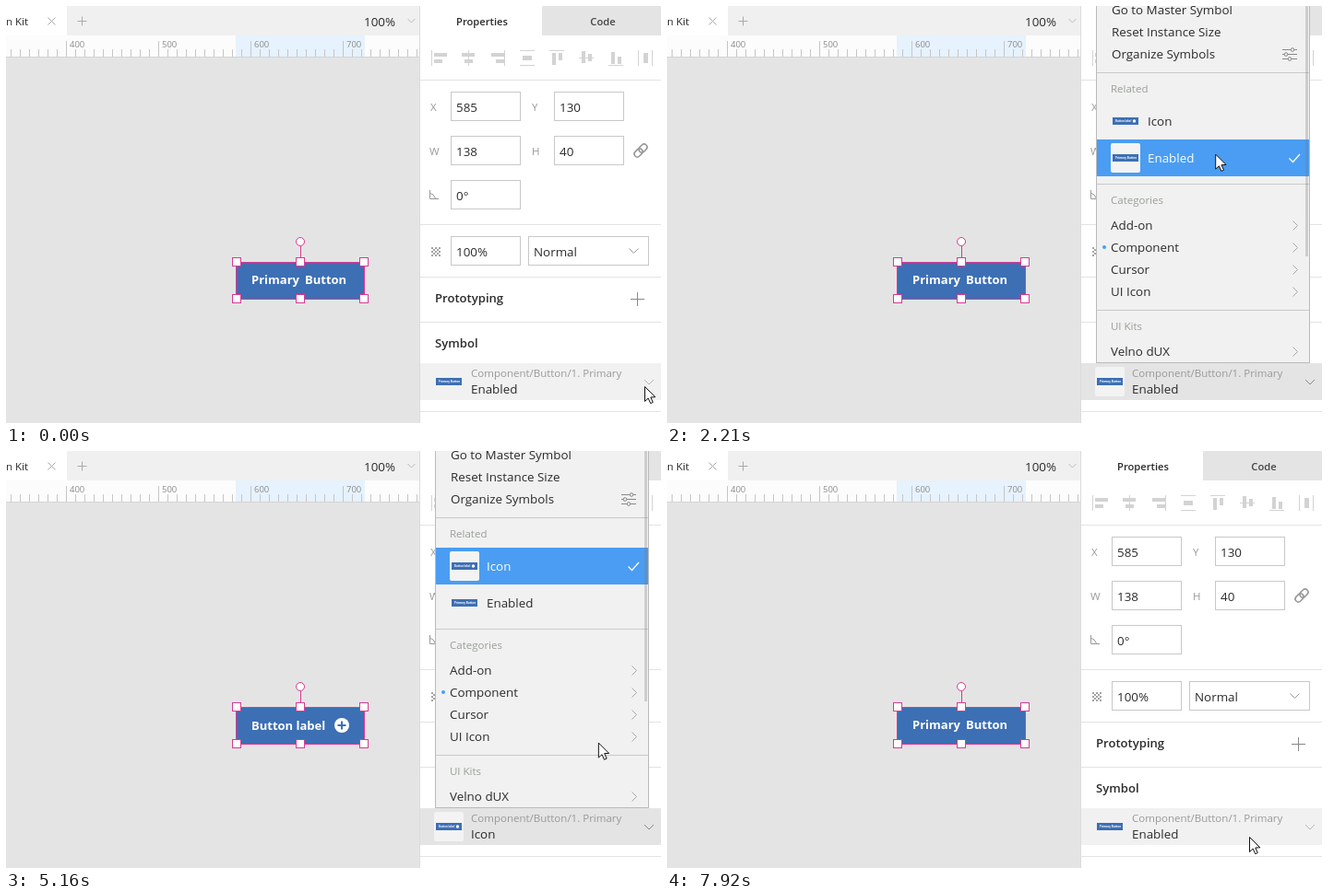
An HTML page with a canvas for the animation above (8 s loop, 710 px wide and 453 px high).

```html
<!DOCTYPE html>
<html lang="en">
<head>
<meta charset="utf-8">
<title>Symbol menu</title>
<style>
html, body { margin: 0; width: 100%; height: 100%; overflow: hidden; background: #e4e4e4; }
canvas { display: block; width: 710px; height: 453px; }
</style>
</head>
<body>
<canvas id="stage" width="710" height="453"></canvas>
<script>
const ctx = document.getElementById('stage').getContext('2d');
const LOOP = 8000;
const INK = '#2b2b2b', MUTED = '#999', BLUE = '#3d6fb4', HIGHLIGHT = '#4a9df2', PINK = '#d83a92';
const BODY = 13.4, SMALL = 11.5;

// Pointer waypoints: time, x, y
const PATH = [
  [0, 692, 413], [1150, 692, 413], [1230, 690, 416], [1800, 629, 255], [1990, 606, 195],
  [2020, 604, 193], [2410, 584, 127], [3600, 584, 127], [4090, 674, 416], [4890, 674, 416],
  [5160, 642, 317], [5530, 589, 160], [6500, 589, 160], [7010, 635, 443], [7150, 635, 443],
  [7160, 635, 460], [7300, 635, 458], [7500, 631, 419], [LOOP, 631, 419]
];
const CLICKS = [[590, 860], [2680, 2790], [4320, 4550], [5710, 5960], [7820, 7920]];
const MENU_OPEN = [[740, 2860], [4430, 6050]];
const ROW_ACTIVE = [[740, 3030], [4430, 6140]];
const ICON_CHOSEN = [[2790, 5960]];
const ICON_APPLIED = [[3030, 6140]];

const within = (spans, t) => spans.some(([a, b]) => t >= a && t < b);

function pointerAt(t) {
  const i = Math.max(1, PATH.findIndex(p => p[0] > t));
  const [t0, x0, y0] = PATH[i - 1], [t1, x1, y1] = PATH[i];
  const k = Math.max(0, (t - t0) / (t1 - t0));
  return { x: x0 + (x1 - x0) * k, y: y0 + (y1 - y0) * k };
}

function box(x, y, w, h, fill, stroke) {
  if (fill) { ctx.fillStyle = fill; ctx.fillRect(x, y, w, h); }
  if (stroke) {
    ctx.strokeStyle = stroke;
    ctx.lineWidth = 1;
    ctx.strokeRect(x + .5, y + .5, w - 1, h - 1);
  }
}

function line(color, width, ...pts) {
  ctx.strokeStyle = color;
  ctx.lineWidth = width;
  ctx.beginPath();
  pts.forEach(([x, y]) => ctx.lineTo(x, y));
  ctx.stroke();
}

function disc(x, y, r, fill, stroke) {
  ctx.beginPath();
  ctx.arc(x, y, r, 0, Math.PI * 2);
  ctx.fillStyle = fill;
  ctx.fill();
  if (stroke) { ctx.strokeStyle = stroke; ctx.lineWidth = 1; ctx.stroke(); }
}

function text(str, x, y, size = BODY, color = INK, weight = 400, align = 'left') {
  ctx.font = `${weight} ${size}px "Open Sans", "Noto Sans", sans-serif`;
  ctx.textAlign = align;
  ctx.fillStyle = color;
  ctx.fillText(str, x, y);
}

const chevronDown = (x, y, r, color) => line(color, 1, [x - r, y - r / 2], [x, y + r / 2], [x + r, y - r / 2]);
const chevronRight = (x, y, color) => line(color, 1, [x - 2.5, y - 5], [x + 2.5, y], [x - 2.5, y + 5]);

function plus(x, y, r, color, width = 1) {
  line(color, width, [x - r, y], [x + r, y]);
  line(color, width, [x, y - r], [x, y + r]);
}

function thumb(x, y, icon) {
  box(x, y, 28, 8, BLUE);
  text(icon ? 'Button label' : 'Primary Button', x + 3, y + 5.4, icon ? 2.8 : 3, '#fff', 700);
  if (icon) disc(x + 23.5, y + 4, 1.7, '#fff');
}

function drawWorkspace(icon) {
  box(0, 0, 449, 453, '#e4e4e4');
  box(0, 0, 449, 32, '#f0f0f0');
  box(0, 0, 66, 32, '#fff');
  text('n Kit', 24, 21, SMALL, INK, 400, 'right');
  line('#aaa', 1, [45.5, 12.5], [53.5, 20.5]);
  line('#aaa', 1, [53.5, 12.5], [45.5, 20.5]);
  plus(82.5, 16.5, 5, '#aaa');
  text('100%', 388, 22);
  chevronDown(439.5, 16, 4, '#bbb');

  box(0, 32, 449, 24, '#fcfcfc');
  box(249, 32, 140, 24, '#e6f2fd');
  for (let x = 5; x < 449; x += 10) {
    const major = (x - 65) % 100 === 0;
    box(x, major ? 38 : 47, 1, major ? 17 : 8, '#c6c6c6');
    if (major) text(String(x + 335), x + 4, 44.5, 9.5, '#8a8a8a');
  }
  box(0, 55, 449, 1, '#d4d4d4');

  box(249, 278, 140, 41, BLUE, PINK);
  if (icon) {
    text('Button label', 266, 303, 13, '#fff', 700);
    disc(364, 298, 8, '#fff');
    plus(364, 298, 4.5, BLUE, 2);
  } else {
    text('Primary', 266, 302, 13, '#fff', 700);
    text('Button', 324, 302, 13, '#fff', 700);
  }
  line(PINK, 1, [319.5, 261], [319.5, 274]);
  disc(319, 256, 4.5, '#fff', PINK);
  for (const x of [250, 319, 388])
    for (const y of [278, 318]) box(x - 5, y - 5, 10, 10, '#fff', PINK);
}

function drawAlignIcons() {
  const c = '#d3d3d3';
  const bar = (x, y, w, h) => box(x, y, w, h, c);
  [[461, 464, 464], [501, 494, 497], [540, 526, 531]].forEach(([axis, a, b]) => {
    bar(axis, 48, 1, 17);
    bar(a, 51, 14, 4);
    bar(b, 58, 9, 4);
  });
  bar(557, 48, 16, 1); bar(557, 64, 16, 1); bar(560, 54, 10, 5);
  [[48, 51, 51], [56, 49, 52], [64, 50, 55]].forEach(([axis, a, b], i) => {
    const x = 589 + i * 32;
    bar(x, axis, 16, 1);
    bar(x + 3, a, 4, 13);
    bar(x + 10, b, 4, 8);
  });
  bar(685, 48, 1, 17); bar(700, 48, 1, 17); bar(691, 51, 5, 11);
}

function drawLink() {
  ctx.save();
  ctx.translate(688, 157);
  ctx.rotate(-Math.PI / 4);
  ctx.strokeStyle = '#999';
  ctx.lineWidth = 1.6;
  for (const x of [-8.5, -1.5]) {
    ctx.beginPath();
    ctx.roundRect(x, -3.3, 10, 6.6, 3.3);
    ctx.stroke();
  }
  ctx.restore();
}

function field(x, y, w, value) {
  box(x, y, w, 32, '#fff', '#c8c8c8');
  text(value, x + 6, y + 22);
}

function drawPanel(open, active, hovered, icon) {
  box(449, 0, 261, 453, '#fff');
  box(448, 0, 1, 453, '#dcdcdc');
  box(581, 0, 129, 32, '#e4e4e4');
  text('Properties', 516, 21, 11.2, INK, 600, 'center');
  text('Code', 647, 21, 11.2, '#444', 600, 'center');
  drawAlignIcons();
  [80, 237, 294, 343, 440].forEach(y => box(449, y, 261, 1, '#e3e3e3'));

  [['X', 460, 114], ['Y', 570, 114], ['W', 459, 162], ['H', 570, 162]]
    .forEach(([s, x, y]) => text(s, x, y, SMALL, MUTED));
  field(482, 93, 76, '585');
  field(594, 93, 76, '130');
  field(482, 141, 76, '138');
  field(594, 141, 76, '40');
  field(482, 189, 76, '0°');
  field(482, 250, 76, '100%');
  field(566, 250, 131, 'Normal');
  chevronDown(680.5, 266, 5, '#999');
  drawLink();
  line('#999', 1, [459.5, 200], [459.5, 209.5], [469, 209.5]);
  line('#999', 1, [460, 203.5], [463, 205], [465.5, 209]);
  for (let i = 0; i < 25; i += 2)
    box(461 + i % 5 * 2, 262 + Math.floor(i / 5) * 2, 2, 2, '#a5a5a5');

  text('Prototyping', 465, 322, 13.1, INK, 600);
  plus(684.5, 318.5, 7.5, '#888');
  text('Symbol', 465, 371, 13.1, INK, 600);

  if (active || hovered) box(449, 388, 261, 40, active ? '#e4e4e4' : '#f1f1f1');
  if (open) tile(464, 392);
  thumb(466, 404, icon);
  text('Component/Button/1. Primary', 504, 403, SMALL, MUTED);
  text(icon ? 'Icon' : 'Enabled', 504, 421);
  chevronDown(697, 408.5, 5, active ? '#888' : '#b5b5b5');
}

function tile(x, y) {
  ctx.fillStyle = '#f3f3f3';
  ctx.beginPath();
  ctx.roundRect(x, y, 32, 32, 2);
  ctx.fill();
}

function drawMenu(iconChosen, pointer) {
  const inMenu = pointer.x > 465 && pointer.x < 697 && pointer.y < 387;
  const over = (top, h) => inMenu && pointer.y >= top && pointer.y < top + h;
  box(465, -1, 232, 389, '#f1f1f1', '#bababa');
  [72, 193, 330].forEach(y => box(466, y, 230, 1, '#c9c9c9'));

  text('Go to Master Symbol', 482, 9);
  text('Reset Instance Size', 482, 33);
  text('Organize Symbols', 482, 57);
  [[47.5, 678], [52.5, 671], [57.5, 675]].forEach(([y, x]) => {
    line('#888', 1, [667, y], [683, y]);
    disc(x, y, 1.8, '#f1f1f1', '#888');
  });

  [['Related', 94], ['Categories', 215], ['UI Kits', 352]]
    .forEach(([s, y]) => text(s, 481, y, SMALL, '#98a096'));

  [['Icon', 105, iconChosen], ['Enabled', 145, !iconChosen]].forEach(([name, y, chosen]) => {
    const hot = over(y, 40);
    if (chosen || hot) {
      box(466, y, 230, 40, chosen ? HIGHLIGHT : '#e4e4e4');
      tile(481, y + 4);
    }
    thumb(483, y + 16, name === 'Icon');
    text(name, 521, y + 25, BODY, chosen ? '#fff' : INK);
    if (chosen) line('#fff', 1.2, [674.5, y + 20.5], [678.5, y + 24.5], [686, y + 16]);
  });

  [['Add-on', 226], ['Component', 250], ['Cursor', 274], ['UI Icon', 298], ['Velno dUX', 363]].forEach(([name, y]) => {
    const hot = over(y, 24);
    if (hot) box(466, y, 230, 24, HIGHLIGHT);
    else if (name === 'Component') disc(474, y + 12, 2, HIGHLIGHT);
    text(name, 481, y + 17, BODY, hot ? '#fff' : INK);
    chevronRight(681, y + 12.5, hot ? '#d5e8fb' : '#a8a8a8');
  });
  box(692, 0, 3, 272, 'rgba(120,120,120,.3)');
}

function drawPointer({ x, y }) {
  ctx.save();
  ctx.translate(x + .5, y + .5);
  ctx.beginPath();
  [[0, 0], [0, 16], [3.7, 12.6], [6.2, 18.2], [8.8, 17], [6.3, 11.5], [11.3, 11.3]]
    .forEach(p => ctx.lineTo(...p));
  ctx.closePath();
  ctx.fillStyle = '#fff';
  ctx.fill();
  ctx.strokeStyle = '#111';
  ctx.lineWidth = 1;
  ctx.stroke();
  ctx.restore();
}

function render(t) {
  const pointer = pointerAt(t);
  const open = within(MENU_OPEN, t);
  const iconChosen = within(ICON_CHOSEN, t);
  const rowHover = pointer.x > 449 && pointer.y >= 388 && pointer.y < 428;
  drawWorkspace(within(ICON_APPLIED, t));
  drawPanel(open, within(ROW_ACTIVE, t), rowHover, iconChosen);
  // Menu hover trails the pointer slightly
  if (open) drawMenu(iconChosen, pointerAt(t - 50));
  if (within(CLICKS, t)) disc(pointer.x, pointer.y, 12, 'rgba(244,240,90,.85)');
  drawPointer(pointer);
}

const start = performance.now();
function tick() {
  render((performance.now() - start) % LOOP);
  requestAnimationFrame(tick);
}
tick();
</script>
</body>
</html>
```
